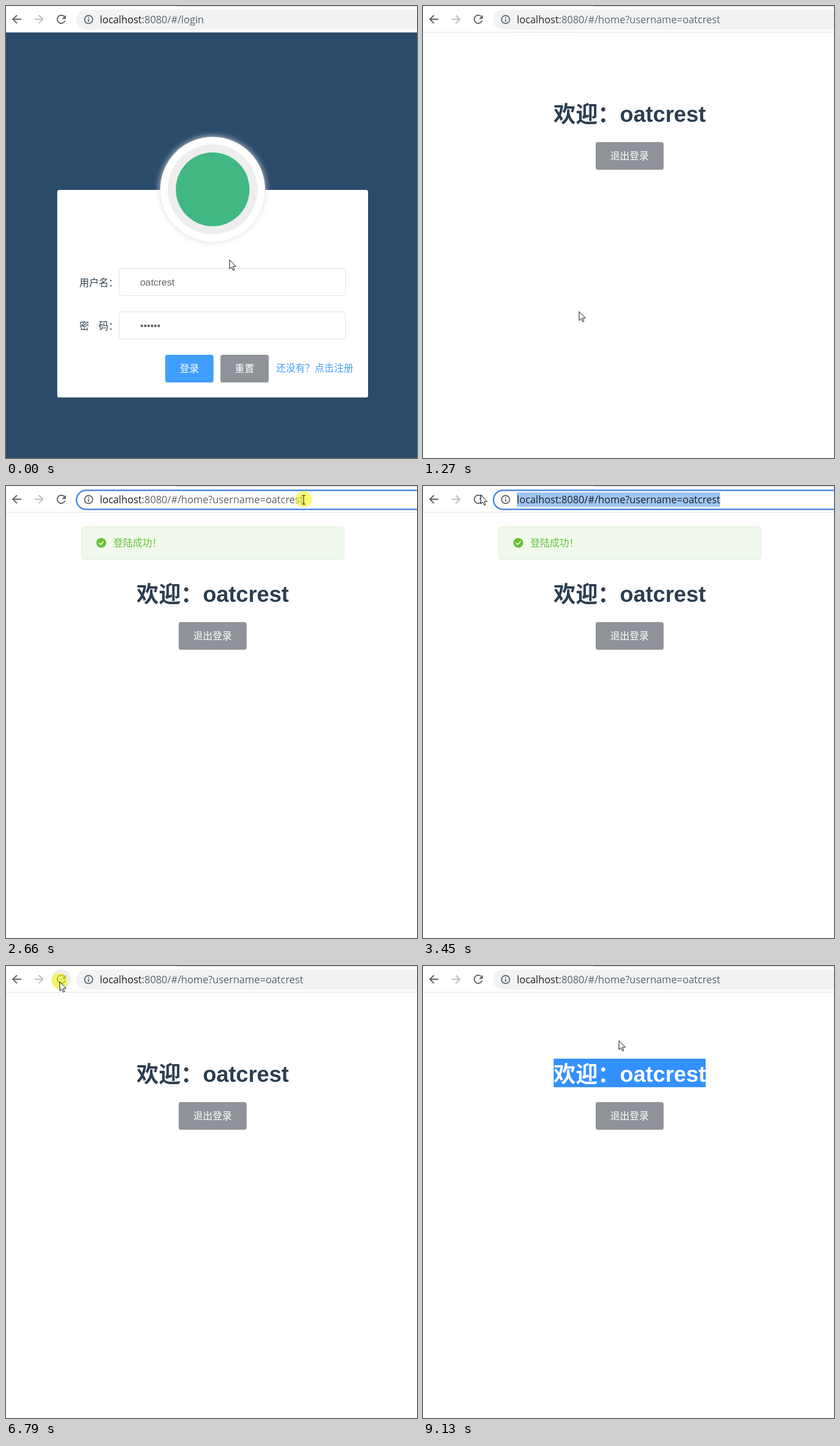
An HTML page with a canvas for the animation above (9.2 s loop, 714 by 784 pixels).

```html
<!DOCTYPE html>
<html lang="zh-CN">
<head>
<meta charset="utf-8">
<title>登录</title>
<style>
html, body { margin: 0; width: 100%; height: 100%; overflow: hidden; background: #fff; }
canvas { display: block; }
</style>
</head>
<body>
<canvas id="stage" width="714" height="784"></canvas>
<script>
const ctx = document.getElementById('stage').getContext('2d');
const LOOP = 9200, HOME_AT = 1260, FOCUS_AT = 2590, RELOAD_AT = 5030, MESSAGE_END = 5530, SELECT_AT = 8110;
const USER = 'oatcrest';
const UI = '"Liberation Sans", "Noto Sans CJK SC", "Noto Sans CJK JP", sans-serif';
const TEXT = '16.8px ' + UI, TITLE = 'bold 38.4px ' + UI;
const URL_FONT = '17.4px "Open Sans", "Noto Sans", sans-serif';

const START = [388, 440];
// Each move eases out along a curve; bend is its control point
const MOVES = [
  { from: 70, until: 490, to: [323, 628], bend: [405, 560] },
  { from: 1200, until: 2400, to: [519, 24], bend: [53, 182] },
  { from: 2660, until: 3120, to: [100, 15] },
  { from: 3590, until: 3710, to: [93, 27] },
  { from: 7340, until: 7900, to: [515, 205] },
  { from: SELECT_AT, until: 8450, to: [164, 192] },
  { from: 8690, until: 9130, to: [340, 129] }
];
const CLICKS = [1010, 4900, 6790];
const DRAGS = [[FOCUS_AT, 3320], [8010, 8690]];

const clamp = v => Math.max(0, Math.min(1, v));
const within = (v, a, b) => v >= a && v < b;
const easeOut = k => 1 - (1 - k) ** 2;

function pointerAt(t) {
  return MOVES.reduce((pos, { from, until, to, bend = to.map((v, i) => (v + pos[i]) / 2) }) => {
    const k = easeOut(clamp((t - from) / (until - from)));
    return pos.map((v, i) => (1 - k) ** 2 * v + 2 * k * (1 - k) * bend[i] + k * k * to[i]);
  }, START);
}

function text(str, x, y, color, font = TEXT) {
  ctx.font = font;
  ctx.fillStyle = color;
  ctx.fillText(str, x, y);
}

function outline(color, width) {
  ctx.strokeStyle = color;
  ctx.lineWidth = width;
  ctx.stroke();
}

function box(x, y, w, h, r, fill, stroke, line = 1) {
  ctx.beginPath();
  ctx.roundRect(x, y, w, h, r);
  ctx.fillStyle = fill;
  ctx.fill();
  if (stroke) outline(stroke, line);
}

function disc(x, y, r, fill) {
  box(x - r, y - r, 2 * r, 2 * r, r, fill);
}

function lines(points, color, width) {
  ctx.beginPath();
  points.forEach(([x, y]) => ctx.lineTo(x, y));
  outline(color, width);
}

function navArrow(x, dir, color) {
  const tip = x + 7 * dir;
  lines([[x - 7.5 * dir, 23], [tip, 23]], color, 2);
  lines([[x, 16], [tip, 23], [x, 30]], color, 2);
}

function drawReload(x, y, r, color) {
  ctx.beginPath();
  ctx.arc(x, y, r, 0.35, 5.5);
  outline(color, 2);
  ctx.beginPath();
  ctx.moveTo(x + r + 1, y - r - 0.5);
  ctx.lineTo(x + r + 1, y - 0.5);
  ctx.lineTo(x + 1, y - 0.5);
  ctx.fillStyle = color;
  ctx.fill();
}

// Redraws the content in selected colours inside the given strip
function select(x0, x1, y, h, color, draw) {
  if (x1 <= x0) return;
  ctx.save();
  ctx.beginPath();
  ctx.rect(x0, y, x1 - x0, h);
  ctx.clip();
  ctx.fillStyle = color;
  ctx.fillRect(x0, y, x1 - x0, h);
  draw();
  ctx.restore();
}

function drawAddress(t, x, focused) {
  const host = 'localhost';
  const rest = ':8080/#/' + (t < HOME_AT ? 'login' : 'home?username=' + USER);
  const left = 163;
  ctx.font = URL_FONT;
  const split = left + ctx.measureText(host).width;
  const right = split + ctx.measureText(rest).width;
  const drawUrl = color => {
    text(host, left, 29.5, '#202124', URL_FONT);
    text(rest, split, 29.5, color, URL_FONT);
  };
  drawUrl('#5f6368');
  if (!focused) return;
  select(Math.max(left, Math.min(x, right - 1)), right, 11, 25, '#9fc5f5', () => drawUrl('#202124'));
}

function drawToolbar(t, x) {
  const focused = within(t, FOCUS_AT, RELOAD_AT);
  const icon = '#5f6368';
  ctx.fillStyle = '#fff';
  ctx.fillRect(0, 0, 714, 46);
  ctx.fillStyle = '#dee1e6';
  ctx.fillRect(296, 0, 418, 1.6);
  ctx.fillRect(0, 45, 714, 1);

  if (within(t, CLICKS[1], 7400)) disc(96, 23, 17, t < RELOAD_AT ? '#e3e5e8' : '#eceef0');
  navArrow(19, -1, icon);
  navArrow(57, 1, '#b8bfc2');
  drawReload(96, 23, 7, icon);

  if (focused) box(122.5, 7.5, 640, 33, 16.5, '#fff', '#4683e6', 2.5);
  else box(122, 6.5, 640, 34.5, 17, '#f1f3f4');
  ctx.beginPath();
  ctx.arc(143.5, 23.5, 7, 0, 7);
  outline(icon, 1.8);
  lines([[143.5, 22.5], [143.5, 27.5]], icon, 1.9);
  lines([[143.5, 19.3], [143.5, 21.2]], icon, 1.9);
  drawAddress(t, x, focused);
}

function drawButton(label, x, y, w, fill) {
  box(x, y, w, 48, 4, fill);
  text(label, x + 25.2, y + 29.5, '#fff');
}

function drawField(label, value, top) {
  text(label, 127.6, top + 30, '#2c3e50');
  box(196.5, top, 393, 47, 4.8, '#fff', '#dcdfe6');
  text(value, 233, top + 29.7, '#606266');
}

function drawLogin(pressed, y) {
  ctx.fillStyle = '#2b4b6b';
  ctx.fillRect(0, 46, 714, 738);
  box(89, 319, 540, 360, 3.6, '#fff');

  ctx.shadowColor = '#ddd';
  ctx.shadowBlur = 12;
  disc(359, 318, 91, '#fff');
  ctx.shadowBlur = 0;
  disc(359, 318, 78, '#eee');
  disc(359, 318, 64, '#41b883');

  drawField('用户名：', USER, 455.5);
  drawField('密　码：', '••••••', 530.5);
  drawButton('登录', 276.5, 605, 84, pressed ? '#3a8ee6' : y > 604 ? '#62adff' : '#409eff');
  drawButton('重置', 372.5, 605, 84, '#909399');
  text('还没有？点击注册', 469.2, 634.3, '#409eff');
}

function drawMessage(t) {
  const p = clamp((t - HOME_AT) / 400);
  ctx.save();
  ctx.globalAlpha = clamp(p / 0.75);
  ctx.translate(0, 57.6 * (easeOut(p) - 1));
  box(131.5, 70.5, 456, 57, 4.8, '#f0f9eb', '#e1f3d8');
  disc(165.5, 98.5, 8.6, '#67c23a');
  lines([[161.5, 98.8], [164.5, 101.6], [169.7, 96]], '#fff', 1.5);
  text('登陆成功！', 186.6, 105.3, '#67c23a');
  ctx.restore();
}

function drawHome(t, x) {
  ctx.fillStyle = '#fff';
  ctx.fillRect(0, 46, 714, 738);
  const title = color => text('欢迎：' + USER, 226.8, 201.3, color, TITLE);
  title('#2c3e50');
  if (t > SELECT_AT) {
    const left = t < DRAGS[1][1] ? Math.max(227, x) : 227;
    select(left, 491, 160.5, 50, '#3390ff', () => title('#fff'));
  }
  drawButton('退出登录', 300, 236, 118, '#909399');
}

const ARROW = new Path2D('M.5 .5V16L4 12.8 6.6 18.4 8.8 17.4 6.4 11.9H11.5Z');
const HAND = new Path2D('M-2 14V2Q0-2 2 2V8Q9 6 11 11L8.5 22.5H-.5L-6 14Q-5 11-2 14Z');

function drawPointer(kind, x, y) {
  ctx.save();
  ctx.translate(x, y);
  if (kind === 'beam') {
    lines([[0, -7.5], [0, 7.5]], '#333', 1.2);
    [-7.5, 7.5].forEach(end => lines([[-3, end], [3, end]], '#333', 1.2));
  } else {
    const shape = kind === 'hand' ? HAND : ARROW;
    ctx.fillStyle = '#fff';
    ctx.fill(shape);
    ctx.strokeStyle = '#111';
    ctx.lineWidth = 1;
    ctx.stroke(shape);
  }
  ctx.restore();
}

function pointerKind(t, x, y, dragging) {
  if (t < HOME_AT) {
    if (y > 604) return 'hand';
    return within(y, 455, 503) || within(y, 530, 578) ? 'beam' : 'arrow';
  }
  const overUrl = x > 150 && y < 42;
  const overTitle = within(x, 227, 520) && within(y, 161, 211);
  return dragging || overUrl || overTitle ? 'beam' : 'arrow';
}

function draw(t) {
  const [x, y] = pointerAt(t);
  const dragging = DRAGS.some(([a, b]) => within(t, a, b));
  const pressed = dragging || CLICKS.some(at => within(t, at, at + 140));
  if (t < HOME_AT) drawLogin(pressed, y);
  else drawHome(t, x);
  drawToolbar(t, x);
  if (within(t, HOME_AT, MESSAGE_END)) drawMessage(t);
  if (pressed) disc(x, y - 1, 14, 'rgba(248,248,20,.6)');
  drawPointer(pointerKind(t, x, y, dragging), x, y);
}

const start = performance.now();
function frame() {
  draw((performance.now() - start) % LOOP);
  requestAnimationFrame(frame);
}
frame();
</script>
</body>
</html>
```
